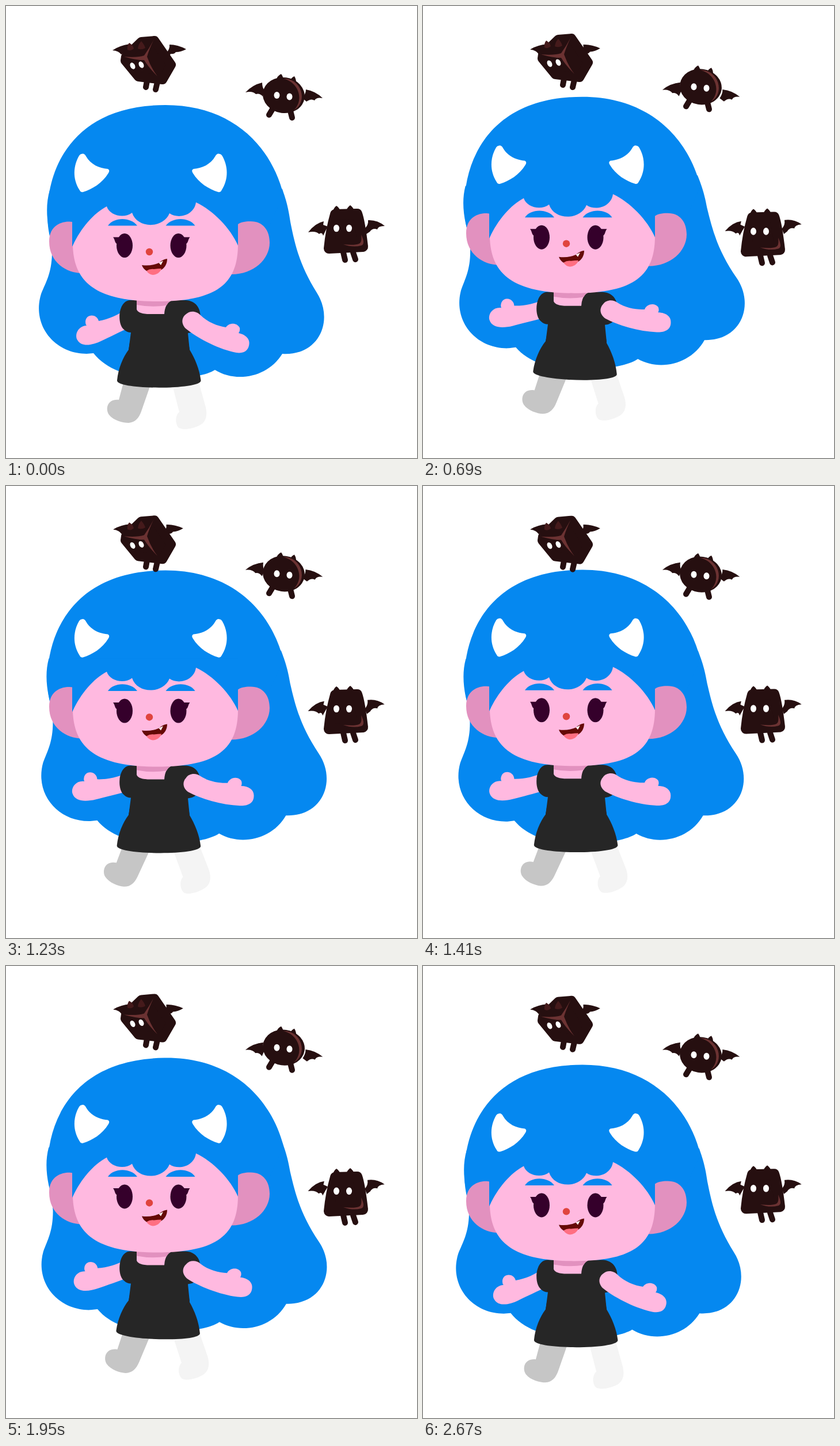
Recreate the animation shown at these times as an HTML page. Size 714x785 px, loop 2.7 s.

```html
<!DOCTYPE html>
<html lang="en">
<head>
<meta charset="utf-8">
<title>Horned girl and bats</title>
<style>
  html, body { margin: 0; width: 100%; height: 100%; overflow: hidden; background: #fff; }
  svg { display: block; width: 714px; height: 785px; }
  .hair { fill: #0588f0; }
  .skin { fill: #ffb9e0; }
  .shade { fill: #e291bf; }
  .dress { fill: #262626; }
  .dark { fill: #35002b; }
  .bat { fill: #260f10; stroke-linecap: round; stroke-linejoin: round; }
  .bat .limb, .bat .block { stroke: #260f10; }
  .bat .edge { fill: #6b3232; }
  .bat .ear { fill: #451a1b; }
  .bat .eye, .white { fill: #fff; }
</style>
</head>
<body>
<svg viewBox="0 0 714 785">
  <g id="girl">
    <path id="backHair" class="hair" d="M76 320 C70 340 70 362 74 385 C78 400 80 415 80 430 C79 465 69 480 61 500 C44 555 85 604 140 604 L152 603 C175 632 215 645 262 645 C310 648 345 643 363 632 C400 655 455 645 480 604 C545 608 570 545 540 498 C510 450 502 415 494 375 C490 345 484 330 480 318 L400 260 H140 Z"/>
    <path id="cap" class="hair" d="M76 400 C60 330 84 172 277 172 C390 172 460 240 482 328 L440 420 Z"/>
    <path id="legL" fill="#c6c6c6" d="M205 650 L196 684 C176 682 172 700 179 710 C187 720 203 724 213 724 C225 723 231 715 235 704 L251 658 V630 H210 Z"/>
    <path id="legR" fill="#f4f4f4" d="M283 635 L301 705 C293 712 294 728 301 733 C310 737 325 734 337 728 C348 722 350 710 347 697 L329 632 Z"/>
    <path id="armL" class="skin" d="M212 524 C195 537 178 544 161 547 C158 534 138 534 138 549 Q138 553 140 555 C124 556 119 572 124 580 C132 594 152 588 165 582 C180 575 200 565 215 558 Z"/>
    <path id="skirt" class="dress" d="M215 585 L213 597 C203 610 195 630 193 650 C190 667 341 667 338.5 650 C336 630 328 612 319 597 L317 585 Z"/>
    <path class="dress" d="M216 511 C195 511 192 552 205 562 Q210 567 217 567 L213 598 H319 L316 568 Q330 567 335 555 C342 535 336 512 312 511 Z"/>
    <path class="skin" d="M227 500 V527 Q230 535 250 535 H275 Q276 517 287 512 V500 Z"/>
    <path class="shade" d="M227 500 V519 Q253 524 279 520 Q282 514 287 511 V500 Z"/>
    <path id="armR" class="skin" d="M313 535 C320 528 332 530 338 537 C350 549 368 556 382 558 C388 549 402 550 406 559 Q407 564 404 568 C418 571 425 580 422 590 C419 603 406 604 395 601 C365 594 330 575 312 560 C303 550 306 540 313 535 Z"/>
    <path class="shade" d="M115 375 C108 373 75 374 75 409 C75 445 105 464 132 464 L150 400 Z M403 379 C410 374 420 374 425 374 C447 374 458 390 458 411 C458 440 430 466 392 466 L380 400 Z"/>
    <path class="hair" d="M115 325 H403 V417 H115 Z"/>
    <path class="skin" d="M116 416 C130 386 152 360 175 348 C180 364 205 370 219 359 C228 387 273 387 284 360 C300 371 327 363 330 341 C360 355 390 386 403 416 C402 480 370 513 262 513 C150 513 118 475 116 416 Z"/>
    <g id="horn" class="white">
      <path d="M131 257 Q136 255 139 261 C147 275 162 282 177 283 Q181 285 178 290 C167 308 150 318 134 323 Q130 324 128 320 C115 300 117 277 127 260 Q129 257 131 257 Z"/>
    </g>
    <use href="#horn" transform="translate(502.5) scale(-1 1)"/>
    <g id="eye">
      <ellipse class="dark" cx="206" cy="416" rx="14" ry="21"/>
      <path class="dark" d="M186 401.5 H205 L194 414 C188 411 190 406 186 401.5 Z"/>
      <path class="hair" d="M177 381.5 C187 366 217 366 228 381.5 Z"/>
    </g>
    <use href="#eye" transform="translate(505.5) scale(-1 1)"/>
    <circle cx="249" cy="427" r="6.2" fill="#e0443e"/>
    <path fill="#650a06" d="M236 450 Q253 452 266 446 Q272 440 280 439 C280 449 275 455 270 458 Q257 465 244 460 Q238 456 236 450 Z"/>
    <path fill="#ff6f82" d="M244 460 Q250 456 257 457 Q264 456 270 456 C268 463 261 467 255 467 Q248 466 244 460 Z"/>
    <path class="white" d="M265.5 446 L269 450 L273 442.500 Z"/>
  </g>

  <g class="bat">
    <path class="wing" d="M185 77 Q196 69 215 66 L218 80 L214 88 Q208 80 200 84 Q196 78 185 77 Z"/>
    <path class="wing" d="M313 75 Q298 67 284 67 Q285 75 278 82 L283 89 L286 83 Q292 84 295 80 Q304 80 313 75 Z"/>
    <g class="body">
      <path class="limb" stroke-width="10" d="M245 130 L243 141 M263 132 L260 145"/>
      <path class="block" stroke-width="16" d="M235 62 L258 60 L287 102 L272 128 L230 123 L207 95 L208 88 Z"/>
      <path class="edge" d="M258 56 Q249 74 245 88 Q252 108 263 122 Q248 107 240 94 Q225 94 205 88 Q228 90 240 86 Q250 72 258 56 Z"/>
      <path class="ear" d="M211 76 Q210 69 214 64 Q221 68 222 74 Q217 79 211 76 Z M229 74 Q230 66 235 61 Q241 68 242 73 Q235 77 229 74 Z"/>
      <ellipse class="eye" cx="220" cy="104" rx="4" ry="6" transform="rotate(-28 220 104)"/>
      <ellipse class="eye" cx="235" cy="102" rx="4" ry="6" transform="rotate(-28 235 102)"/>
    </g>
  </g>

  <g class="bat">
    <path class="wing" d="M416 150 Q428 137 445 133 Q445 142 449 146 L446 157 Q441 151 434 153 Q428 147 416 150 Z"/>
    <path class="wing" d="M521 145 Q538 148 550 160 Q539 158 536 164 Q530 160 522 166 L515 160 Q521 152 521 145 Z"/>
    <g class="body">
      <path class="limb" stroke-width="10" d="M463 179 L457 189 M494 182 L497 194"/>
      <path d="M469 130 Q471 121 478 118 Q482 123 482 130 Z M493 130 Q496 124 501 122 Q505 128 504 138 Z"/>
      <ellipse cx="482.500" cy="155" rx="36.500" ry="31" transform="rotate(8 482.500 155)"/>
      <path class="edge" d="M482 126 C513 125 526 166 500 181 C517 165 511 134 482 126 Z"/>
      <ellipse class="eye" cx="470.500" cy="155" rx="5" ry="6"/>
      <ellipse class="eye" cx="492.500" cy="157.500" rx="5" ry="6"/>
    </g>
  </g>

  <g class="bat">
    <path class="wing" d="M525 393 Q537 377 552 374 L551 380 L559 383 Q555 390 551 399 Q549 392 544 396 Q538 390 525 393 Z"/>
    <path class="wing" d="M629 372 Q645 371 658 382 Q646 382 645 388 Q637 385 632 392 L626 396 L623 387 Q630 380 629 372 Z"/>
    <g class="body">
      <path class="limb" stroke-width="10" d="M586 428 L589 441 M603 428 L607 440"/>
      <path d="M567 360 Q569 350 574 347 Q579 350 582 358 Z M590 358 Q593 349 598 346 Q603 349 606 358 Z"/>
      <path class="block" stroke-width="18" d="M572 362 L610 361 Q615 375 620 418 L561 421 Q564 390 572 362 Z"/>
      <path class="edge" d="M617 397 Q625 414 617 416 Q603 420 586 414 Q606 416 613 413 Q619 411 617 397 Z"/>
      <ellipse class="eye" cx="574" cy="386" rx="5" ry="6.3"/>
      <ellipse class="eye" cx="596" cy="386" rx="5" ry="6.3"/>
    </g>
  </g>
</svg>
<script>
  const LOOP = 2700, STEP = 30;
  const byId = id => document.getElementById(id);
  const move = (el, value) => el.setAttribute('transform', value);
  const turn = (id, angle, x, y) => move(byId(id), `rotate(${angle} ${x} ${y})`);

  // Triangle wave: 0 at the ends of the period, 1 in the middle.
  const wave = (t, period) => 1 - Math.abs(1 - 2 * (t % period) / period);

  // Linear interpolation through [time, value] pairs.
  function track(t, keys) {
    const i = keys.findIndex(key => key[0] > t);
    const [t0, v0] = keys[i - 1], [t1, v1] = keys[i];
    return v0 + (v1 - v0) * (t - t0) / (t1 - t0);
  }

  // Each wing: turn in degrees, horizontal shift, and the joint it turns on.
  const bats = [
    { lift: -4, wings: [[3, 1, 214, 78], [-3, -5, 284, 78]] },
    { lift: -15, wings: [[8, 0, 447, 147], [-4, 0, 519, 154]] },
    { lift: 5.5, wings: [[4, 0, 555, 386], [-5, 0, 626, 384]] }
  ];
  document.querySelectorAll('.bat').forEach((el, i) => {
    bats[i].bodyEl = el.querySelector('.body');
    bats[i].wingEls = el.querySelectorAll('.wing');
  });

  function draw(t) {
    const rise = wave(t, LOOP), bob = wave(t, LOOP / 2);
    const arms = track(t, [[0, 0], [675, 1], [1350, 1], [LOOP, 0]]);
    const sway = track(t, [[0, 0], [675, 2.4], [1350, 1.5], [1620, 2.6], [LOOP, 0]]);
    const drop = track(t, [[0, 0], [1350, 0.5], [1620, 8], [LOOP, 0]]);
    const tilt = track(t, [[0, 0], [1350, 0], [2025, 1], [LOOP, 0]]);

    move(byId('girl'), `translate(0 ${-28 * rise})`);
    move(byId('backHair'), `translate(0 ${drop}) rotate(${-sway} 250 383)`);
    turn('cap', -tilt, 480, 325);
    turn('armL', 11.5 * arms, 220, 528);
    turn('armR', -11.5 * arms, 300, 535);
    turn('legL', 6.3 * rise, 235, 640);
    turn('legR', -6.3 * rise, 300, 640);
    turn('skirt', 2 * bob, 235, 600);

    const flap = Math.min(1, 3 * wave(t, 180));
    for (const { lift, wings, bodyEl, wingEls } of bats) {
      move(bodyEl, `translate(0 ${lift * bob})`);
      wings.forEach(([angle, shift, x, y], side) =>
        move(wingEls[side], `translate(${shift * flap} 0) rotate(${angle * flap} ${x} ${y})`));
    }
  }

  const start = performance.now();
  function tick() {
    const t = (performance.now() - start) % LOOP;
    draw(Math.floor(t / STEP) * STEP);
    requestAnimationFrame(tick);
  }
  tick();
</script>
</body>
</html>
```
